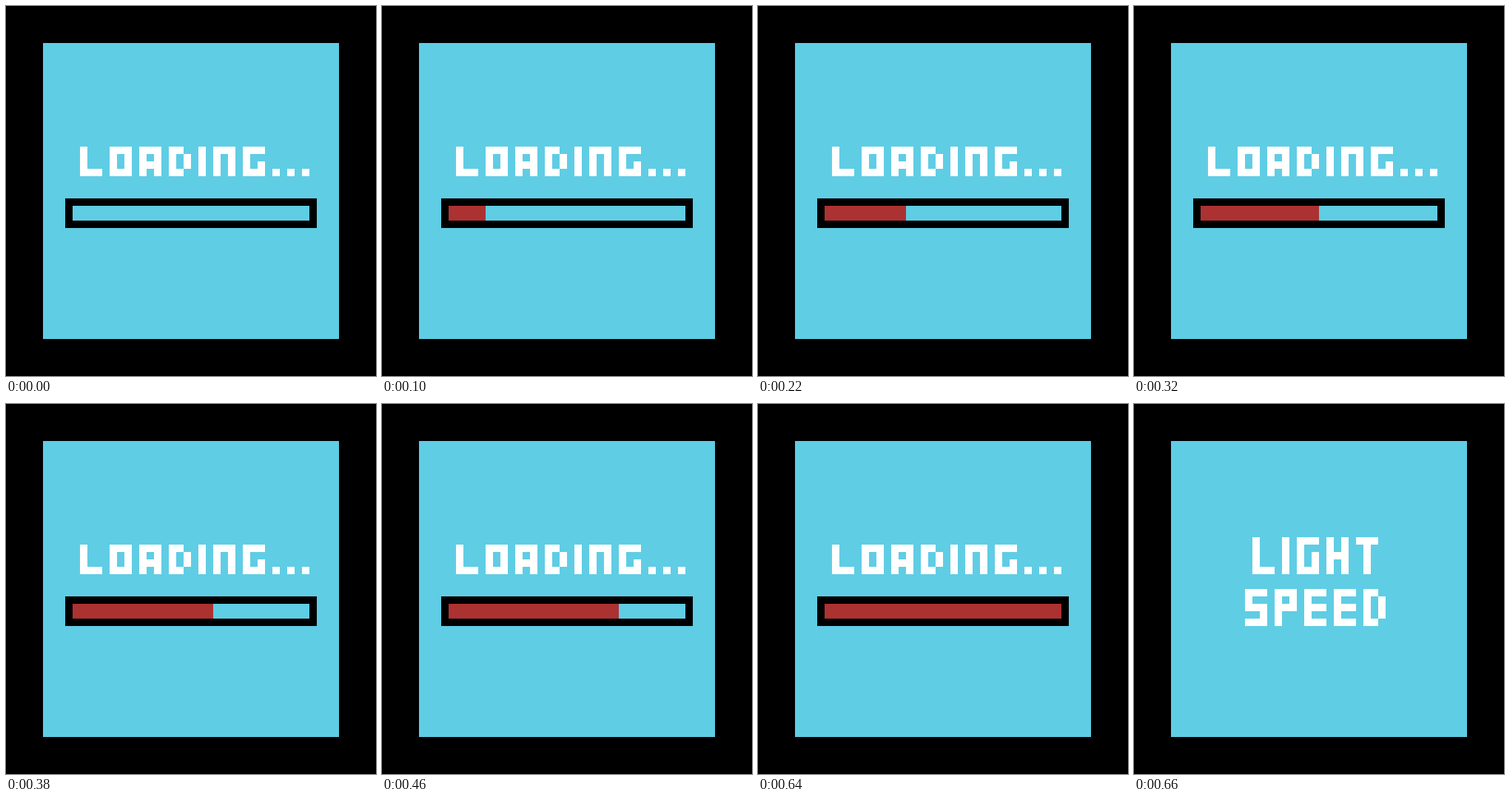
Write an HTML page that moves like this. It is 500 px wide and 500 px high and loops after 1 s.

```html
<!DOCTYPE html>
<html lang="en">
<head>
<meta charset="utf-8">
<title>Loading</title>
<style>
  html, body { margin: 0; width: 100%; height: 100%; overflow: hidden; background: #000; }
  svg { display: block; width: 100%; height: 100%; }
</style>
</head>
<body>
<svg viewBox="0 0 50 50" shape-rendering="crispEdges">
  <rect width="50" height="50" fill="#000"/>
  <rect x="5" y="5" width="40" height="40" fill="#5fcde4"/>
  <g id="loading" role="img" aria-label="LOADING...">
    <path id="word" fill="#fff"/>
    <path d="M8 26h34v4h-34zM9 27v2h32v-2z" fill="#000" fill-rule="evenodd"/>
    <rect id="fill" x="9" y="27" width="0" height="2" fill="#ac3232"/>
  </g>
  <g id="done" role="img" aria-label="LIGHT SPEED" visibility="hidden">
    <path id="phrase" fill="#fff"/>
  </g>
</svg>
<script>
const LOOP = 1000, STEP = 20, DONE_AT = 660, BAR = 32;
const el = id => document.getElementById(id);

// Turns rows of "#" into a path of unit squares placed at x, y.
function pixels(x, y, rows) {
  let d = "";
  rows.forEach((row, j) => [...row].forEach((c, i) => {
    if (c === "#") d += `M${x + i} ${y + j}h1v1h-1z`;
  }));
  return d;
}

el("word").setAttribute("d", pixels(10, 19, [
  "#...###.###.##..#.###.###......",
  "#...#.#.#.#.#.#.#.#.#.#........",
  "#...#.#.###.#.#.#.#.#.#.#......",
  "###.###.#.#.##..#.#.#.###.#.#.#"
]));

el("phrase").setAttribute("d", pixels(16, 18, [
  "#...#.###.#.#.###",
  "#...#.#...#.#..#.",
  "#...#.#.#.###..#.",
  "#...#.#.#.#.#..#.",
  "###.#.###.#.#..#."
]) + pixels(15, 25, [
  "###.###.###.###.##.",
  "#...#.#.#...#...#.#",
  "###.###.###.###.#.#",
  "..#.#...#...#...#.#",
  "###.#...###.###.##."
]));

function draw(t) {
  const done = t >= DONE_AT;
  el("loading").setAttribute("visibility", done ? "hidden" : "visible");
  el("done").setAttribute("visibility", done ? "visible" : "hidden");
  el("fill").setAttribute("width", Math.min(BAR, Math.floor(t / STEP)));
}

let start;
function tick(now) {
  start ??= now;
  draw(Math.max(0, now - start) % LOOP);
  requestAnimationFrame(tick);
}
draw(0);
requestAnimationFrame(tick);
</script>
</body>
</html>
```
